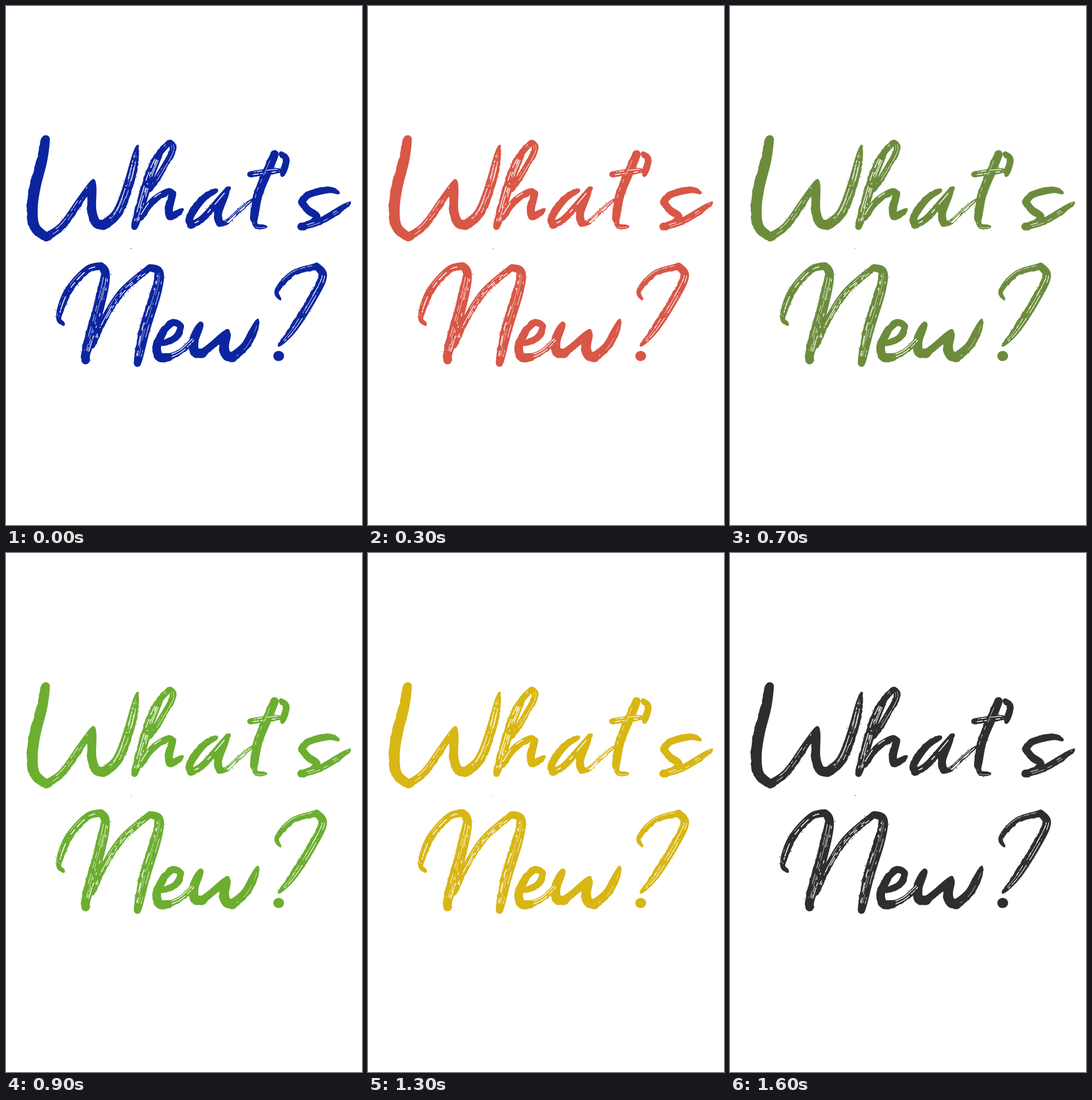
Recreate the animation shown at these times as an HTML page with a canvas. Size 620 by 903 pixels, loop 1700 ms.

```html
<!DOCTYPE html>
<html lang="en">
<head>
<meta charset="utf-8">
<title>What's New?</title>
<style>
  html, body { margin: 0; width: 100%; height: 100%; overflow: hidden; background: #fff; }
  canvas { display: block; }
</style>
</head>
<body>
<canvas id="stage" width="620" height="903" role="img" aria-label="What's New?"></canvas>
<script>
const ctx = document.getElementById('stage').getContext('2d');
const STEP = 100, STEPS = 17;

// Key colours by step; the steps between them are mixed.
const KEYS = {
  0: [12, 37, 159], 3: [216, 87, 71], 7: [108, 140, 60], 9: [108, 174, 48],
  11: [212, 204, 26], 13: [216, 182, 20], 16: [46, 46, 46]
};

// Each stroke: key points | width at start, middle and end | dryness.
const LETTERS = {
  W: [
    '69,232 63,268 52,310 46,350 50,384 70,402 | 15 19 15 | 0',
    '70,402 98,382 128,340 152,303 | 15 13 4 | .5',
    '152,305 149,350 156,376 170,381 | 7 16 17 | 0',
    '170,381 195,358 216,302 229,243 | 17 17 3 | 1'
  ],
  h: [
    '250,320 271,287 290,252 285,238 268,255 | 8 11 11 | .5',
    '268,255 252,290 238,335 224,384 | 11 17 11 | 1',
    '234,370 255,340 282,323 291,328 | 8 12 11 | .3',
    '291,326 284,352 287,366 308,354 | 11 14 4 | 0'
  ],
  a: [
    '366,321 343,335 321,366 322,381 | 7 13 13 | 0',
    '322,381 345,367 388,317 | 13 12 6 | .3',
    '386,318 370,358 372,378 | 7 14 13 | 0',
    '372,378 384,376 406,356 429,336 | 13 7 2 | .8'
  ],
  t: [
    '468,258 457,284 439,328 432,370 | 14 16 13 | .3',
    '432,370 436,383 454,384 | 13 9 2 | .3',
    '425,293 446,290 480,286 | 10 11 3 | .6'
  ],
  apostrophe: ['479,257 488,268 481,295 | 8 12 5 | 0'],
  s: [
    '579,325 562,320 528,328 515,341 | 5 12 13 | 0',
    '515,341 525,354 541,366 533,378 514,384 | 13 13 13 | 0',
    '516,384 552,372 601,341 | 12 12 1 | .5'
  ],
  N: [
    '100,554 92,540 108,496 141,459 166,452 | 5 13 12 | .4',
    '166,452 173,470 160,530 140,600 139,616 | 12 19 14 | 1',
    '150,592 171,545 202,497 250,455 | 8 12 11 | .8',
    '250,455 266,462 263,492 241,565 229,622 | 11 19 12 | 1'
  ],
  e: [
    '272,587 295,577 304,558 291,551 276,563 | 9 12 12 | 0',
    '276,563 263,590 267,610 284,611 | 12 15 14 | 0',
    '284,611 306,600 329,578 | 14 10 7 | .6'
  ],
  w: [
    '339,554 328,580 329,602 342,604 | 10 16 16 | 0',
    '342,604 362,588 386,566 | 15 13 8 | 0',
    '386,570 380,590 383,606 394,611 | 10 17 17 | 0',
    '394,611 416,592 430,567 439,545 | 17 15 2 | .3'
  ],
  query: [
    '478,511 472,495 500,465 541,453 | 3 10 13 | .3',
    '541,453 552,470 534,508 500,562 475,591 | 13 15 4 | .7',
    '474,609 476,609 | 16 18 16 | 0'
  ]
};

let seed = 7;
const rand = () => (seed = seed * 16807 % 2147483647) / 2147483647;
const mix = (a, b, t) => a + (b - a) * t;

// Samples a Catmull-Rom curve about every half pixel.
function sample(points) {
  const out = [];
  for (let i = 0; i < points.length - 1; i++) {
    const b = points[i], c = points[i + 1];
    const a = points[i - 1] || b, d = points[i + 2] || c;
    const n = Math.ceil(Math.hypot(c[0] - b[0], c[1] - b[1]) * 2);
    for (let k = 0; k < n; k++) {
      const t = k / n;
      out.push(b.map((v, j) => v + t / 2 * (c[j] - a[j] +
        t * (2 * a[j] - 5 * v + 4 * c[j] - d[j] + t * (3 * (v - c[j]) + d[j] - a[j])))));
    }
  }
  return [...out, points.at(-1)];
}

// Turns a stroke into spots with place, width and normal.
function parse(text) {
  const [path, widths, dry] = text.split(' | ');
  const [start, middle, end] = widths.split(' ').map(Number);
  const line = sample(path.split(' ').map(p => p.split(',').map(Number)));
  const last = line.length - 1;
  const spots = line.map(([x, y], i) => {
    const side = 2 * i / last - 1;
    const p = line[Math.max(0, i - 1)], q = line[Math.min(last, i + 1)];
    const len = Math.hypot(q[0] - p[0], q[1] - p[1]) || 1;
    return {
      x, y,
      w: mix(middle, side < 0 ? start : end, Math.abs(side) ** 3),
      nx: (p[1] - q[1]) / len, ny: (q[0] - p[0]) / len
    };
  });
  return { spots, dry: Number(dry) };
}

function dot(x, y, r) {
  ctx.moveTo(x + r, y);
  ctx.arc(x, y, r, 0, Math.PI * 2);
}

// Body with a rough edge, and crumbs beside dry strokes.
function ink({ spots, dry }) {
  let rough = 0;
  for (const { x, y, w, nx, ny } of spots) {
    rough = rough * .85 + (rand() - .5) * .4;
    dot(x + nx * rough, y + ny * rough, Math.max(.4, w / 2 + rough));
    if (rand() < dry * .06) {
      const off = (w / 2 + rand() * 2) * (rand() < .5 ? -1 : 1);
      dot(x + nx * off, y + ny * off, .3 + rand() * .6);
    }
  }
}

// Broken hairlines where the bristles left no ink.
function scratch({ spots, dry }) {
  const hairs = Math.round(dry * 4);
  for (let h = 0; h < hairs; h++) {
    const off = ((h + rand()) / hairs - .5) * .6;
    const size = .4 + rand() * .5;
    let on = false;
    spots.forEach(({ x, y, w, nx, ny }, i) => {
      if (rand() < .1) on = rand() < .55;
      const t = i / spots.length;
      if (on && t > .12 && t < .9) dot(x + nx * w * off, y + ny * w * off, size * (.7 + rand() * .4));
    });
  }
}

function layer(draw) {
  ctx.beginPath();
  draw();
  ctx.fill();
}

const strokes = Object.values(LETTERS).flat().map(parse);
layer(() => {
  strokes.forEach(ink);
  dot(218, 422, .8);
});
ctx.globalCompositeOperation = 'destination-out';
layer(() => strokes.forEach(scratch));
ctx.globalCompositeOperation = 'source-in';

function color(step) {
  const keys = Object.keys(KEYS).map(Number);
  const to = keys.find(k => k >= step);
  const from = keys.findLast(k => k <= step);
  const t = to > from ? (step - from) / (to - from) : 0;
  return `rgb(${KEYS[from].map((v, i) => Math.round(mix(v, KEYS[to][i], t)))})`;
}

let shown = -1;
function frame() {
  const step = Math.floor(performance.now() / STEP) % STEPS;
  if (step !== shown) {
    shown = step;
    ctx.fillStyle = color(step);
    ctx.fillRect(0, 0, 620, 903);
  }
  requestAnimationFrame(frame);
}
frame();
</script>
</body>
</html>
```
